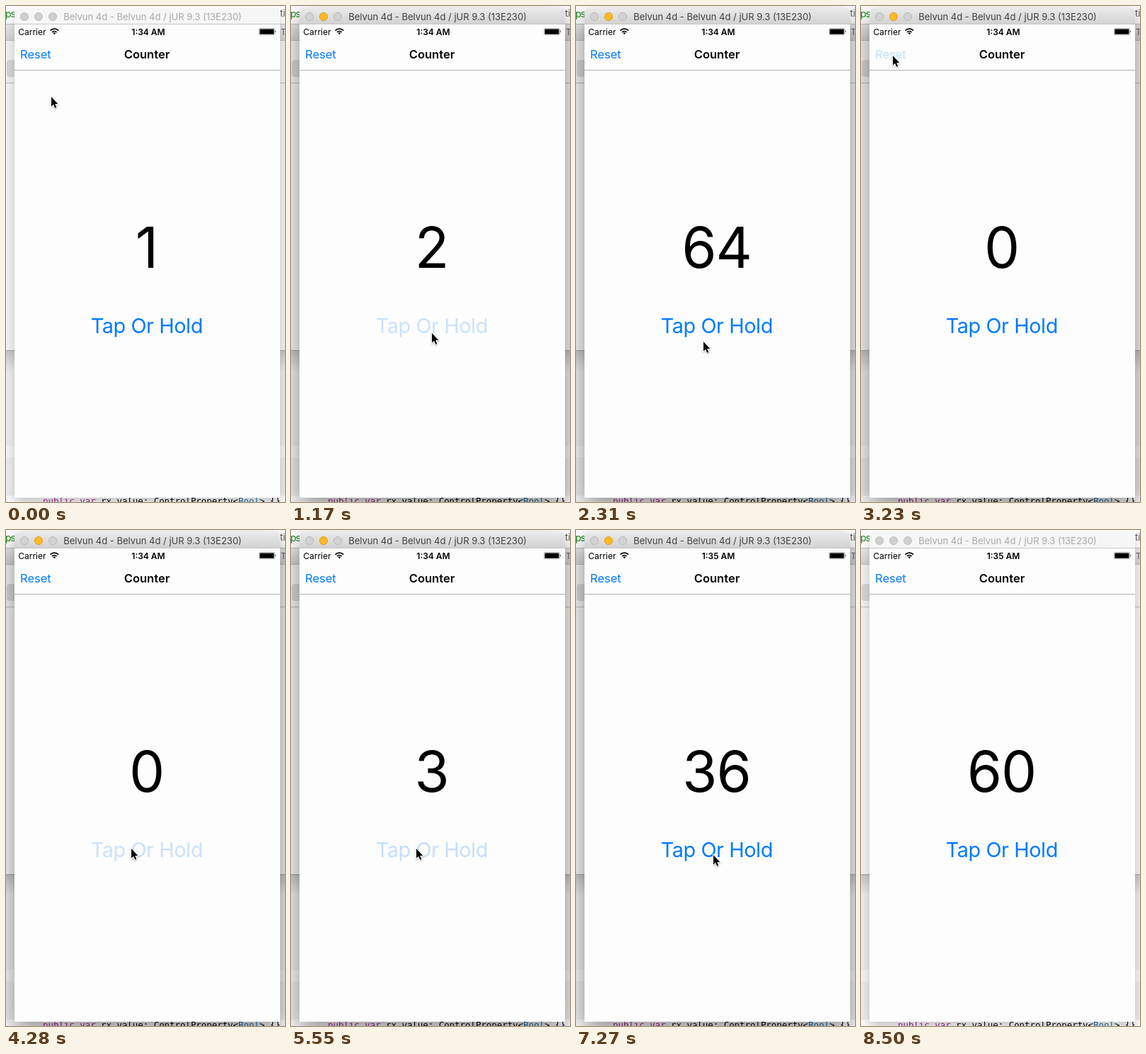
An HTML page for the animation above (8560 ms loop, 394x699 px).

```html
<!DOCTYPE html>
<html lang="en">
<head>
<meta charset="utf-8">
<title>Counter</title>
<style>
  html, body { margin: 0; width: 100%; height: 100%; overflow: hidden; background: #fff; }
  svg { display: block; width: 100%; height: 100%; font-family: Inter, sans-serif; }
  .mono { font: 12.4px "DejaVu Sans Mono", monospace; white-space: pre; }
  .blue { fill: #007aff; }
  .mid { text-anchor: middle; }
  .light { fill: #cfcfcf; stroke: #c2c2c2; }
  #shadow { filter: drop-shadow(0 8px 8px rgba(0, 0, 0, .2)); }
  #bar { fill: #f6f6f6; }
  #title { fill: #a8a8a8; }
  #cursor { filter: drop-shadow(0 1px 1px rgba(0, 0, 0, .3)); }
  .active #shadow { filter: drop-shadow(0 12px 16px rgba(0, 0, 0, .42)); }
  .active #bar { fill: url(#chrome); }
  .active #title { fill: #404040; }
  .active .light { fill: #d2d2d2; stroke: #b9b9b9; }
  .active #minimize { fill: #fdb924; stroke: #dfa023; }
</style>
</head>
<body>
<svg id="stage" viewBox="0 0 394 699">
  <defs>
    <linearGradient id="chrome" x2="0" y2="1">
      <stop stop-color="#eaeaea"/><stop offset="1" stop-color="#d2d2d2"/>
    </linearGradient>
    <linearGradient id="under" x2="0" y2="1">
      <stop stop-color="#c4c4c4"/><stop offset="1" stop-color="#ededed"/>
    </linearGradient>
  </defs>

  <!-- windows behind the simulator -->
  <rect width="394" height="699" fill="#fff"/>
  <text x="-1" y="16" font-size="14" letter-spacing="-1" fill="#16891c">ps</text>
  <text x="387" y="15" font-size="13" fill="#555">ti</text>
  <rect y="25" width="394" height="23" fill="url(#chrome)"/>
  <rect y="48" width="394" height="60" fill="#f2f2f2"/>
  <path d="M0 25.5H394M0 48.5H394M0 108.5H394" stroke="#bdbdbd"/>
  <text x="388" y="41" font-size="12" fill="#665577">T</text>
  <rect x="1" y="76" width="20" height="24" rx="4" fill="#d6d6d6"/>
  <rect y="109" width="394" height="376" fill="#f3f3f3"/>
  <rect y="485" width="394" height="30" fill="url(#under)"/>
  <rect y="515" width="394" height="184" fill="#ededed"/>
  <rect y="620" width="394" height="16" fill="#f5f5f5"/>
  <path d="M0 485.5H394" stroke="#a6a6a6"/>
  <rect y="690" width="394" height="9" fill="#fafafa"/>
  <text class="mono" x="52" y="702"><tspan fill="#a0228f">public var</tspan> rx_value: <tspan>ControlProperty&lt;</tspan><tspan fill="#1a6fa8">Bool</tspan>&gt; {}</text>

  <!-- simulator window -->
  <rect id="shadow" x="12" y="3" width="375" height="690" rx="5" fill="#fff"/>
  <path id="bar" d="M12 25V8a5 5 0 0 1 5-5H382a5 5 0 0 1 5 5V25Z"/>
  <path d="M12 25.5H387" stroke="#c6c6c6"/>
  <circle class="light" cx="26" cy="15" r="5.6"/>
  <circle class="light" id="minimize" cx="46" cy="15" r="5.6"/>
  <circle class="light" cx="66" cy="15" r="5.6"/>
  <text id="title" class="mid" x="207" y="20" font-size="13">Belvun 4d - Belvun 4d / jUR 9.3 (13E230)</text>
  <rect x="12" y="26" width="375" height="667" fill="#fdfdfd"/>
  <path d="M12 90.5H387" stroke="#b2b2b2"/>

  <!-- status bar -->
  <text x="17.2" y="40.5" font-size="12">Carrier</text>
  <g fill="none" stroke="#000" stroke-width="1.7">
    <path d="M62.5 34.6a8.2 8.2 0 0 1 11.6 0M64.9 37a4.9 4.9 0 0 1 6.8 0"/>
    <path d="M66.4 38.3a2.7 2.7 0 0 1 3.8 0L68.3 40.3Z" fill="#000" stroke="none"/>
  </g>
  <text id="clock" class="mid" x="201" y="40.5" font-size="12" font-weight="600"></text>
  <rect x="357.4" y="31.4" width="22" height="9.4" rx="1.5" fill="none" stroke="#888" stroke-width=".6"/>
  <rect x="358.4" y="32.4" width="20" height="7.4" rx=".6"/>
  <path d="M380 34.3q1.8 1.7 0 3.4Z"/>

  <!-- app -->
  <text id="reset" class="blue" x="20" y="74" font-size="16.5">Reset</text>
  <text class="mid" x="199" y="74" font-size="16.5" font-weight="600">Counter</text>
  <text id="count" class="mid" x="198.5" y="369" font-size="79.5" letter-spacing="-1"></text>
  <text id="button" class="blue mid" x="198.8" y="460.5" font-size="28.8" letter-spacing="-.4">Tap Or Hold</text>

  <path id="cursor" d="M0 0V13.6L3.1 10.8 5.2 15.8 7.3 14.9 5.2 10H9.3Z"
        stroke="#fff" stroke-width="1.8" paint-order="stroke"/>
</svg>
<script>
const LOOP = 8560;
const FADE = 250;
const [stage, clock, reset, count, button, cursor] =
  ["stage", "clock", "reset", "count", "button", "cursor"].map(id => document.getElementById(id));

// [press, release] times
const buttonTouches = [[690, 1170], [4280, 4670], [4970, 5190], [5380, 5525], [5720, 5875], [6130, 6610]];
const resetTouches = [[3060, 3200]];
const taps = [4690, 5210, 5550, 5900];

// [time, x, y] of the pointer tip
const pointer = [
  [50, 64, 128], [640, 199, 461], [1170, 199, 461], [2020, 182, 473], [2150, 181, 478],
  [2310, 180, 473], [2880, 71, 73], [3040, 45, 70], [3250, 45, 70], [3600, 246, 473],
  [3760, 226, 463], [4000, 177, 447], [4100, 177, 449], [6800, 177, 449],
  [7270, 194, 458], [7440, 198, 470], [7600, 200, 470], [7960, 376, 706]
];

const smooth = p => p * p * (3 - 2 * p);

function pointerAt(t) {
  const next = pointer.findIndex(key => key[0] > t);
  if (next === 0) return pointer[0].slice(1);
  if (next < 0) return pointer.at(-1).slice(1);
  const [t0, x0, y0] = pointer[next - 1], [t1, x1, y1] = pointer[next];
  const p = smooth((t - t0) / (t1 - t0));
  return [x0 + (x1 - x0) * p, y0 + (y1 - y0) * p];
}

// A touch dims the label at once; letting go fades it back.
function opacityAt(t, touches) {
  const last = touches.findLast(([press]) => t >= press);
  if (!last) return 1;
  return 0.2 + 0.8 * smooth(Math.min(1, Math.max(0, (t - last[1]) / FADE)));
}

function countAt(t) {
  const held = (start, first, step, limit) => Math.min(limit, first + Math.floor((t - start) / step));
  if (t < 1170) return 1;
  if (t < 3200) return held(1170, 2, 18.2, 64);
  if (t < 6610) return taps.filter(tap => t >= tap).length;
  return held(6610, 5, 21, 60);
}

function draw(now) {
  const t = now % LOOP;
  stage.classList.toggle("active", t >= 690 && t < 8500);
  clock.textContent = t < 6940 ? "1:34 AM" : "1:35 AM";
  count.textContent = countAt(t);
  button.style.opacity = opacityAt(t, buttonTouches);
  reset.style.opacity = opacityAt(t, resetTouches);
  cursor.setAttribute("transform", `translate(${pointerAt(t)})`);
  requestAnimationFrame(draw);
}
draw(0);
</script>
</body>
</html>
```
